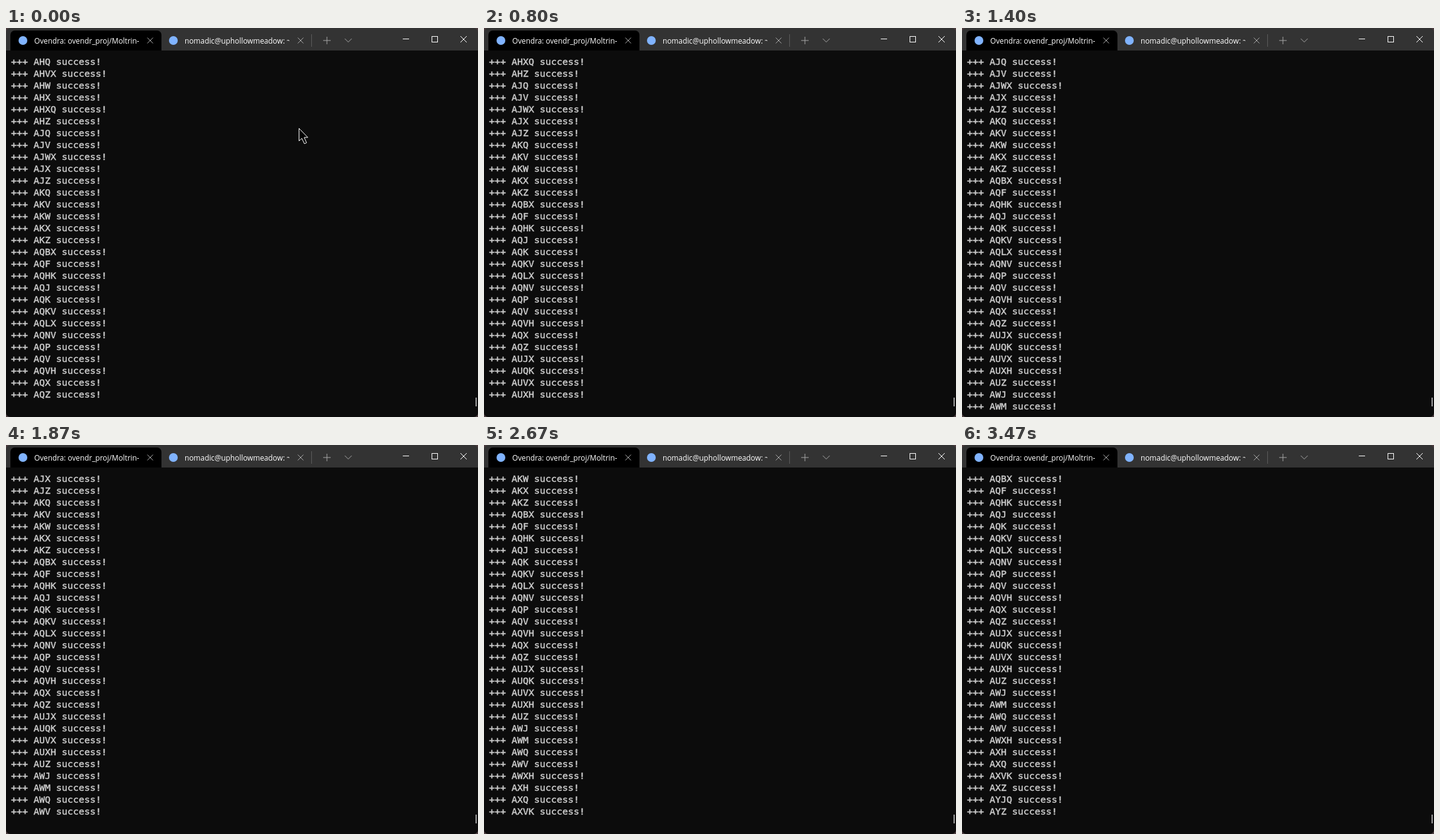
Animation, 753 px wide and 622 px high, one loop 3590 ms. Source, as an HTML page with a canvas:

```html
<!DOCTYPE html>
<html lang="en">
<head>
<meta charset="utf-8">
<style>
  html, body { margin: 0; width: 100%; height: 100%; overflow: hidden; background: #0c0c0c; }
  canvas { display: block; }
</style>
</head>
<body>
<canvas id="stage" width="753" height="622"></canvas>
<script>
const ctx = document.getElementById('stage').getContext('2d');
const W = 753, H = 622, LOOP = 3590;
const ROWS = 29, ROW_HEIGHT = 19, FIRST_BASELINE = 59;

const codes = (
  'AHQ AHVX AHW AHX AHXQ AHZ AJQ AJV AJWX AJX AJZ AKQ AKV AKW AKX AKZ ' +
  'AQBX AQF AQHK AQJ AQK AQKV AQLX AQNV AQP AQV AQVH AQX AQZ AUJX AUQK ' +
  'AUVX AUXH AUZ AWJ AWM AWQ AWV AWXH AXH AXQ AXVK AXZ AYJQ AYZ'
).split(' ');

// Moments when the list scrolls, and when the next line shows up below it first.
const scrollTimes = [130, 330, 530, 800, 1000, 1200, 1470, 1670, 1870, 2070,
                     2330, 2530, 2670, 2870, 3130, 3470];
const printTimes = [70, 270, 730, 930, 1400, 1600, 2270, 2470, 3400];

function stroke(color, width, ...lines) {
  ctx.strokeStyle = color;
  ctx.lineWidth = width;
  ctx.beginPath();
  for (const [x, y, ...rest] of lines) {
    ctx.moveTo(x, y);
    for (let i = 0; i < rest.length; i += 2) ctx.lineTo(rest[i], rest[i + 1]);
  }
  ctx.stroke();
}

function cross(x, y, r, color) {
  stroke(color, 1, [x - r, y - r, x + r, y + r], [x + r, y - r, x - r, y + r]);
}

function tabLabel(text, x) {
  ctx.fillStyle = '#80b3ff';
  ctx.beginPath();
  ctx.arc(x - 18, 20, 7, 0, 7);
  ctx.fill();
  ctx.save();
  ctx.beginPath();
  ctx.rect(x, 4, 167, 32);
  ctx.clip();
  ctx.fillStyle = '#fff';
  ctx.font = '11.8px "Open Sans", "Noto Sans", sans-serif';
  ctx.fillText(text, x, 25);
  ctx.restore();
}

function drawWindow() {
  ctx.fillStyle = '#4a3c3e';
  ctx.fillRect(0, 0, W, H);
  ctx.save();
  ctx.beginPath();
  ctx.roundRect(0, 0, W, H, 7);
  ctx.clip();
  ctx.fillStyle = '#333';
  ctx.fillRect(0, 0, W, 36);
  ctx.fillStyle = '#0c0c0c';
  ctx.fillRect(0, 36, W, H - 36);
  ctx.restore();

  ctx.fillStyle = '#000';
  ctx.beginPath();
  ctx.roundRect(7, 4, 241, 32, [7, 7, 0, 0]);
  ctx.fill();
  tabLabel('Ovendra: ovendr_proj/Moltrin-Ka', 45);
  tabLabel('nomadic@uphollowmeadow: ~', 285);

  cross(230, 20, 4.5, '#a6a6a6');
  cross(470, 20, 4.5, '#a6a6a6');
  stroke('#5c5c5c', 1, [487.5, 10, 487.5, 30]);
  stroke('#a6a6a6', 1, [506, 20, 518, 20], [512, 14, 512, 26],
         [540.5, 17, 546, 22.5, 551.5, 17]);
  stroke('#fff', 1, [633, 17.5, 643, 17.5]);
  ctx.strokeRect(679.5, 13.5, 9, 9);
  cross(730, 18, 5, '#fff');
  ctx.fillStyle = '#9f9f9f';
  ctx.fillRect(749, 591, 2, 14);
}

function drawList(t) {
  const passed = times => times.filter(time => time <= t);
  const scrolls = passed(scrollTimes), prints = passed(printTimes);
  const top = scrolls.length;
  const pending = (prints.pop() || 0) > (scrolls.pop() || 0);
  ctx.fillStyle = ctx.strokeStyle = '#ccc';
  ctx.lineWidth = 0.45;
  ctx.font = '14.95px "DejaVu Sans Mono", monospace';
  codes.slice(top, top + ROWS + pending).forEach((code, row) => {
    const line = [`+++ ${code} success!`, 8, FIRST_BASELINE + row * ROW_HEIGHT];
    ctx.fillText(...line);
    ctx.strokeText(...line); // slightly heavier than regular weight
  });
}

// The pointer glides out through the bottom edge at 15 steps per second.
function drawPointer(t) {
  const step = Math.floor((t + 4) * 15 / 1000);
  if (step > 8) return;
  const p = step / 8;
  ctx.save();
  ctx.translate(Math.round(467 - 634.2 * p + 267.2 * p * p),
                Math.round(160 + 690.3 * p - 244.3 * p * p));
  const arrow = new Path2D('M.5 .5V20.5L5 16.5L9 25L12.5 23.5L8.7 15H14.5Z');
  ctx.fillStyle = '#000';
  ctx.fill(arrow);
  ctx.strokeStyle = '#fff';
  ctx.lineWidth = 1;
  ctx.stroke(arrow);
  ctx.restore();
}

function draw() {
  const t = performance.now() % LOOP;
  drawWindow();
  drawList(t);
  drawPointer(t);
  requestAnimationFrame(draw);
}
draw();
</script>
</body>
</html>
```
